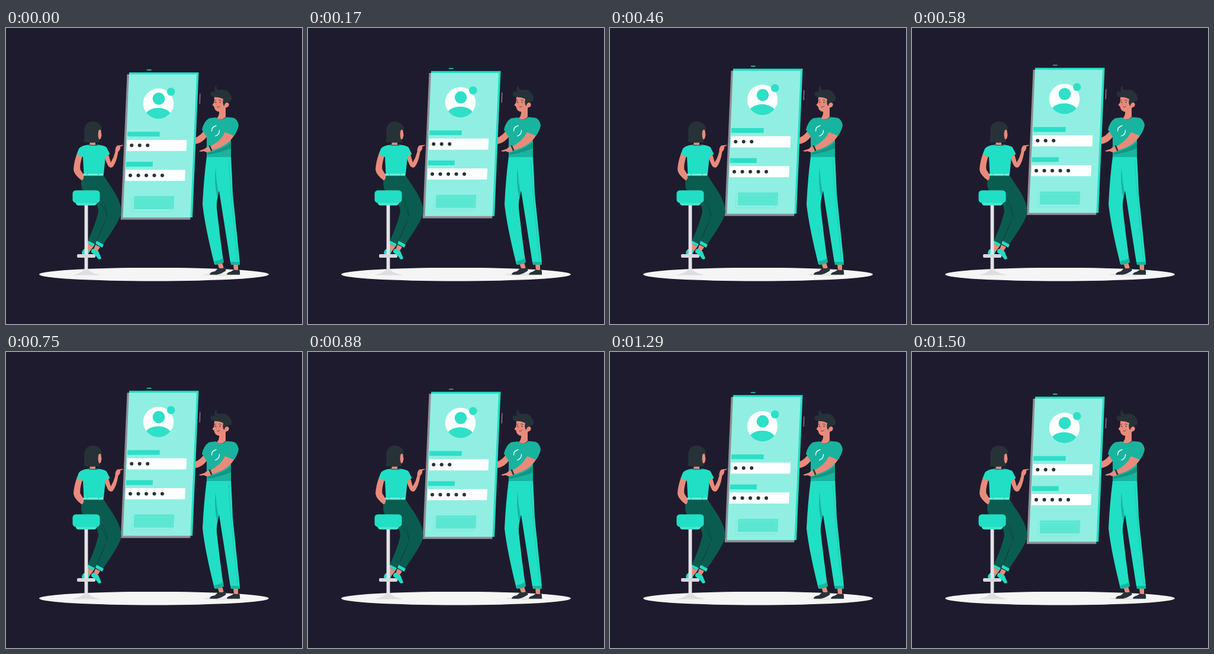
Recreate the animation shown at these times as an HTML page. Size 500x500 px, loop 1540 ms.

```html
<!DOCTYPE html>
<html lang="en">
<head>
<meta charset="utf-8">
<title>Sign-in panel</title>
<style>
html, body { margin: 0; width: 100%; height: 100%; overflow: hidden; background: #1f1b2e; }
svg { display: block; width: 100vw; height: 100vh; }
.teal { fill: #20dfc5; }
.deep { fill: #18b49f; }
.dark { fill: #263238; }
.skin { fill: #e98b7b; }
.pants { fill: #0b5c50; }
.white { fill: #fff; }
.line { fill: none; stroke-linecap: round; stroke-linejoin: round; }
</style>
</head>
<body>
<svg viewBox="0 0 500 500">
  <defs>
    <clipPath id="disc"><circle cx="257.5" cy="127.7" r="25.7"/></clipPath>
  </defs>
  <rect width="500" height="500" fill="#1f1b2e"/>
  <ellipse cx="250" cy="416.2" rx="194" ry="11.3" fill="#f5f5f5"/>
  <ellipse cx="366" cy="416.5" rx="33" ry="2.2" fill="#e6e6e6"/>

  <!-- man -->
  <g id="man">
    <path class="skin" d="M336 170Q330 182 318 186V196Q331 196 342 180Z"/>
    <path class="skin" d="M357 397l8-1 3 10h-8zM384 398h8v11h-7z"/>
    <path class="dark" d="M344 416Q345 412 353 411L359 405Q364 408 369 404Q372 407 371.500 410Q362 416 356 416.700H345Q344 416.700 344 416Z"/>
    <path class="dark" d="M373 416Q374 412.500 380 411.500L385 408Q390 410 394 408Q396 412 395 416.700H374Q373 416.700 373 416Z"/>
    <path class="teal" d="M339 217H380Q382 250 383 280L395 396Q387 400 379 396L360 275Q355 292 356 305Q361 350 367 393Q361 400 352 399Q336 335 332 298Q334 255 339 217Z"/>
    <path class="deep" d="M354 236Q355 258 359 279L357 288Q351 262 354 236Z"/>
    <path class="deep" d="M352 394Q360 393 367 389L368 396Q361 400 353 400ZM379 395H395V400H380Z"/>
    <path d="M376 222Q378 255 382 300L391 393" class="line" stroke="#18b49f" stroke-width=".5"/>
    <path class="skin" d="M360 139L371 134V150Q366 157 355 153Q361 149 360 139Z"/>
    <path class="deep" d="M343 152.500L354 151Q364 158 372 150.500L383 151.500Q391 153 393 164Q392 172 386 181L380 186V218H339V184L331 172Q334 158 343 152.500Z"/>
    <path d="M340 211Q366 205 380 193V203Q365 210 340 214Z" fill="#129684"/>
    <path class="skin" d="M370 176L385 182Q374 200 346 207L343 201Q362 192 370 176Z"/>
    <path class="skin" d="M347 200Q341 199 336 204L326 207.500Q327 209.500 334 208Q340 212 347 207Z"/>
    <path d="M344 199.500L347 206.500" class="line" stroke="#263238" stroke-width="2.600"/>
    <path d="M347.500 174Q347 167 355 165M360.500 173Q361 180 353.500 182.500" class="line" stroke="#fff" stroke-width="1.300"/>
    <path class="skin" d="M352 116Q361 112 372 119Q377 125 373 133Q367 142 360 141.500Q353 141 351.500 133L348.500 130L351.500 126Z"/>
    <path class="dark" d="M351 117Q344 115 346 109Q348 106 353 108Q350 100 356 97Q354 102 360 105Q373 102 378 111Q383 117 380 123Q375 124 374 128Q370 126 368.500 132Q365 128 367 120Q358 116 351 117Z"/>
    <ellipse class="skin" cx="373" cy="130" rx="3.500" ry="4" transform="rotate(20 373 130)"/>
    <circle class="dark" cx="354" cy="125.500" r=".9"/>
    <circle class="dark" cx="361.500" cy="125.500" r=".9"/>
    <path d="M352 122.500l2.500-.7M359.500 121.800q2-.8 4 .6M357 133.500q3 1 4.500-1.500" class="line" stroke="#263238" stroke-width=".8"/>
    <path d="M356.500 125l-1.500 5 2 .3" class="line" stroke="#d66f62" stroke-width=".7"/>
  </g>

  <!-- sliding panel -->
  <g id="panel">
    <path class="teal" d="M208 75H325.500L315 320H197.500Z"/>
    <path d="M204.500 78.300H322L311.300 323.700H193.800Z" fill="#fff" fill-opacity=".5"/>
    <path d="M238.500 70.700H245" class="line" stroke="#20dfc5" stroke-width="1.400"/>
    <path d="M327.900 111.500L327.200 128" class="line" stroke="#c9c8d0" stroke-width=".8"/>
    <circle class="white" cx="257.500" cy="127.700" r="25.700"/>
    <circle cx="258" cy="119.400" r="10.300" fill="#2fdfc8"/>
    <ellipse cx="257" cy="152" rx="24" ry="17" fill="#2fdfc8" clip-path="url(#disc)"/>
    <circle cx="278.700" cy="107.600" r="6.800" fill="#2fdfc8"/>
    <path d="M205.300 175.200H259.800L259.500 183.300H205ZM203 226H248L247.700 234.200H202.700Z" fill="#2ddfc7"/>
    <path class="white" d="M204.500 189H305.200L304.400 207.800H203.700ZM202.300 239.500H303L302.200 258.200H201.500Z"/>
    <g id="dots" class="dark"></g>
    <path d="M216.500 284H284.200L283.300 306H215.600Z" fill="#5be6d2"/>
    <path d="M212.800 288H280.500L279.600 310H211.900Z" fill="none" stroke="#6fead8" stroke-width=".8"/>
  </g>

  <!-- woman and stool -->
  <g id="woman">
    <path d="M112 417.500Q130 413 132.500 407H138.500Q141 413 161 417.500Z" fill="#dedee1"/>
    <path class="skin" d="M138 364l10 5-7 9-7-2zM151 366l8 4-5 8-7-1z"/>
    <path class="teal" d="M128 380Q129 373 135 372.500Q137 376 142 376L139 382H129Z"/>
    <path class="pants" d="M131 249H165Q173 262 180 272Q196 297 194.500 313Q192 326 163 367L152 361Q164 338 170 319Q160 345 149 366L138 360Q152 330 156 310Q155 297 148 291Q133 284 128 270Q125 257 131 249Z"/>
    <path d="M155 283Q169 293 171 317M157 294Q166 300 171 319" class="line" stroke="#084a41" stroke-width="1"/>
    <path class="teal" d="M139 359.500L150 365L148 369L137 363.500ZM153 359.500L165 366L162.500 371L151 364.500Z"/>
    <rect x="132.600" y="298" width="5.800" height="112" fill="#e4e4e8"/>
    <rect x="120" y="382" width="31" height="6" rx="2" fill="#d8d8dd"/>
    <path class="teal" d="M144 376Q146 372 150 373Q152 377 156 377L161 389Q160 391.500 156 390.500Q152 384 144 379Z"/>
    <path d="M117.500 294H154Q153 299.700 149 299.700H122Q118 299.700 117.500 294Z" fill="#47e7d2"/>
    <path class="skin" d="M120 212L129 216Q124 232 125.500 239L131 248Q132 256 128 257.500Q115 248 114 239Q115 225 120 212Z"/>
    <path class="skin" d="M165 214L172.500 211Q175 221 177 227Q182 219 184.500 209Q184 202 188 198.500L197.500 197.500Q198.500 199 193 200Q194 205 189.500 209Q187 226 180.500 234.500Q176 238 172 232Q168 224 165 214Z"/>
    <path class="skin" d="M142 190H151V200H141Z"/>
    <path class="teal" d="M138 197.500Q148 200 157 197.500Q168 199 170 202L175.500 213L168 217L165 247H131.500L130 218L119.500 213L123 204Q127 198.500 138 197.500Z"/>
    <path d="M139 197.200Q148 199.500 156.500 197.200" class="line" stroke="#11826f" stroke-width="1.500"/>
    <path d="M130.500 246H164.500V249.500H130Z" fill="#72ead9"/>
    <path d="M137 245.500v4M156 245.500v4" class="line" stroke="#18b49f" stroke-width=".8"/>
    <path class="skin" d="M152 166Q160 167 160.500 174L161.500 181L160 187Q157 190 151 188Z"/>
    <path class="dark" d="M131.500 192.500Q133 184 132 174Q133 158 147 158Q158 158 162 168.500Q162 172 159 172Q157 171 156 175Q154 184 159.500 192.500Q145 195 131.500 192.500Z"/>
    <rect class="teal" x="112.500" y="274.200" width="46" height="21.200" rx="5.500"/>
  </g>
</svg>
<script>
const LOOP = 1540, STEPS = 37, TURN = 17.5, RATE = 0.56;
const panel = document.getElementById("panel");
const dots = document.getElementById("dots");

function addDots(count, x, y) {
  for (let i = 0; i < count; i++) {
    const dot = document.createElementNS("http://www.w3.org/2000/svg", "circle");
    dot.setAttribute("cx", x + 13.5 * i);
    dot.setAttribute("cy", y);
    dot.setAttribute("r", 3);
    dots.append(dot);
  }
}
addDots(3, 212.2, 198.2);
addDots(5, 210, 248.9);

// Constant speed up, then constant speed down.
function draw(now) {
  const step = Math.floor((now % LOOP) / LOOP * STEPS + 0.15) % STEPS;
  const y = RATE * (Math.abs(step - TURN) - TURN);
  panel.setAttribute("transform", `translate(0 ${y.toFixed(2)})`);
}

const start = performance.now();
function tick() {
  draw(performance.now() - start);
  requestAnimationFrame(tick);
}
tick();
</script>
</body>
</html>
```
